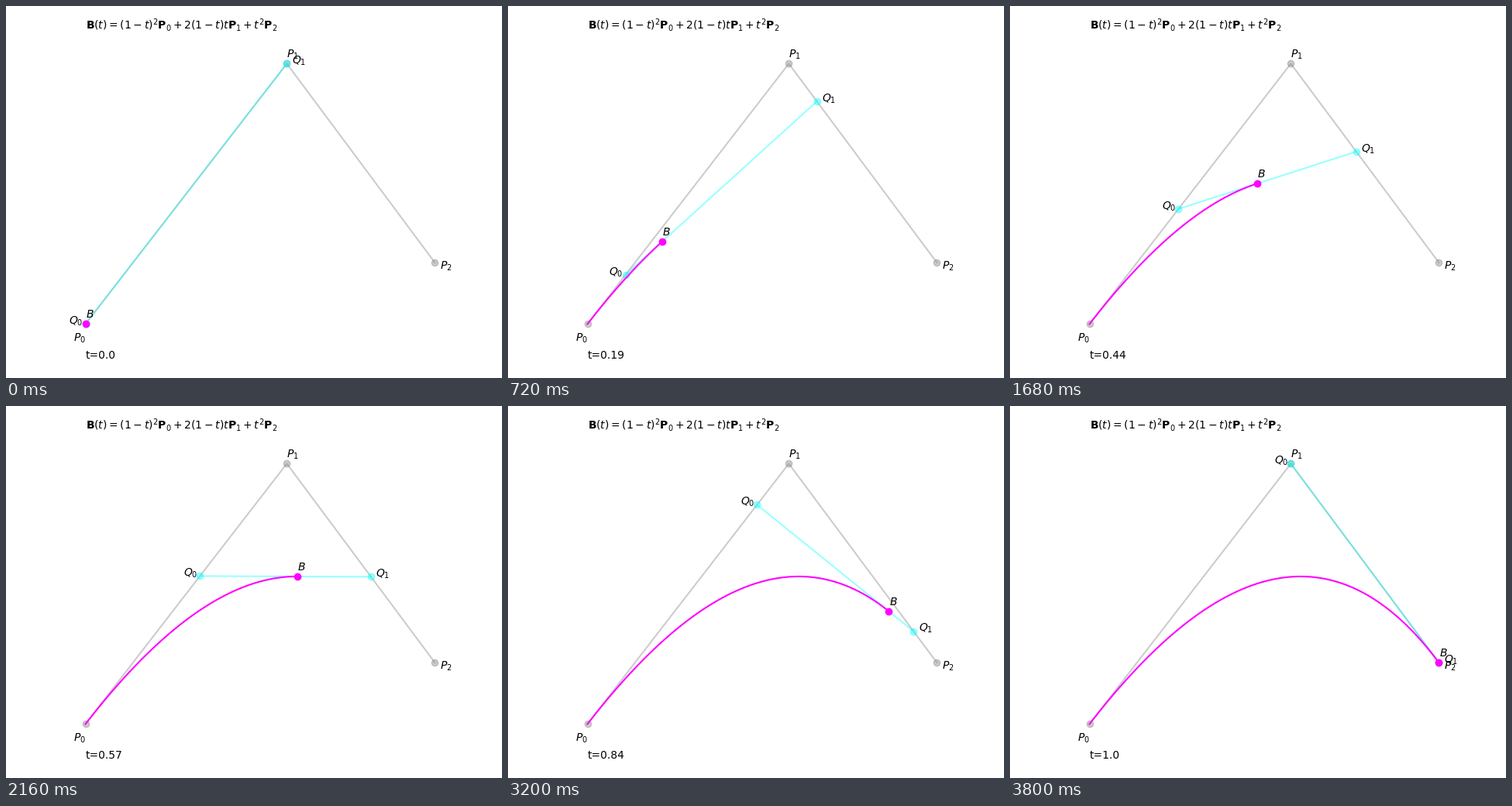
Write a matplotlib script that moves like this. It is 640 by 480 pixels and loops after 3840 ms.

```python
import numpy as np
import matplotlib.pyplot as plt
from matplotlib.animation import FuncAnimation

W, H, DPI = 640, 480, 100
FRAMES, INTERVAL = 96, 40

# Control points in stage pixels, y pointing down
P0 = np.array([102.55, 410.4])
P1 = np.array([362.35, 74.4])
P2 = np.array([553.45, 331.2])

# Label offsets from their points
Q0_OFF, Q1_OFF, B_OFF = (-21.5, 0.4), (6.4, 0.2), (0.3, -7.9)


def lerp(a, b, t):
    return a + (b - a) * t


def bezier(t):
    t = np.asarray(t)[..., None]
    return lerp(lerp(P0, P1, t), lerp(P1, P2, t), t)


fig = plt.figure(figsize=(W / DPI, H / DPI), dpi=DPI, facecolor="white")
ax = fig.add_axes([0, 0, 1, 1])
ax.set_xlim(0, W)
ax.set_ylim(H, 0)
ax.axis("off")


def label(text, point, offset=(0, 0)):
    return ax.text(point[0] + offset[0], point[1] + offset[1], text, fontsize=10)


def move(text, point, offset):
    text.set_position((point[0] + offset[0], point[1] + offset[1]))


ax.plot(*np.array([P0, P1, P2]).T, "o-", color="gray", alpha=0.4)
link, = ax.plot([], [], "o-", color="cyan", alpha=0.4)
curve, = ax.plot([], [], color="magenta")
dot, = ax.plot([], [], "o", color="magenta")

label(r"$\mathbf{B}(t)=(1-t)^2\mathbf{P}_0+2(1-t)t\mathbf{P}_1+t^2\mathbf{P}_2$",
      (102.55, 30))
label("$P_0$", P0, (-15.2, 22.6))
label("$P_1$", P1, (0, -8.2))
label("$P_2$", P2, (7, 8.8))
q0_label = label("$Q_0$", P0)
q1_label = label("$Q_1$", P1)
b_label = label("$B$", P0)
t_label = label("", (102.55, 455))

times = np.linspace(0, 1, FRAMES)
path = bezier(times)


def update(i):
    t = times[i]
    q0, q1, b = lerp(P0, P1, t), lerp(P1, P2, t), path[i]
    link.set_data([q0[0], q1[0]], [q0[1], q1[1]])
    curve.set_data(path[:i + 1, 0], path[:i + 1, 1])
    dot.set_data([b[0]], [b[1]])
    move(q0_label, q0, Q0_OFF)
    move(q1_label, q1, Q1_OFF)
    move(b_label, b, B_OFF)
    t_label.set_text(f"t={round(float(t), 2)}")
    return link, curve, dot, q0_label, q1_label, b_label, t_label


anim = FuncAnimation(fig, update, frames=FRAMES, interval=INTERVAL,
                     repeat=True, repeat_delay=0, blit=False)
plt.show()
```
